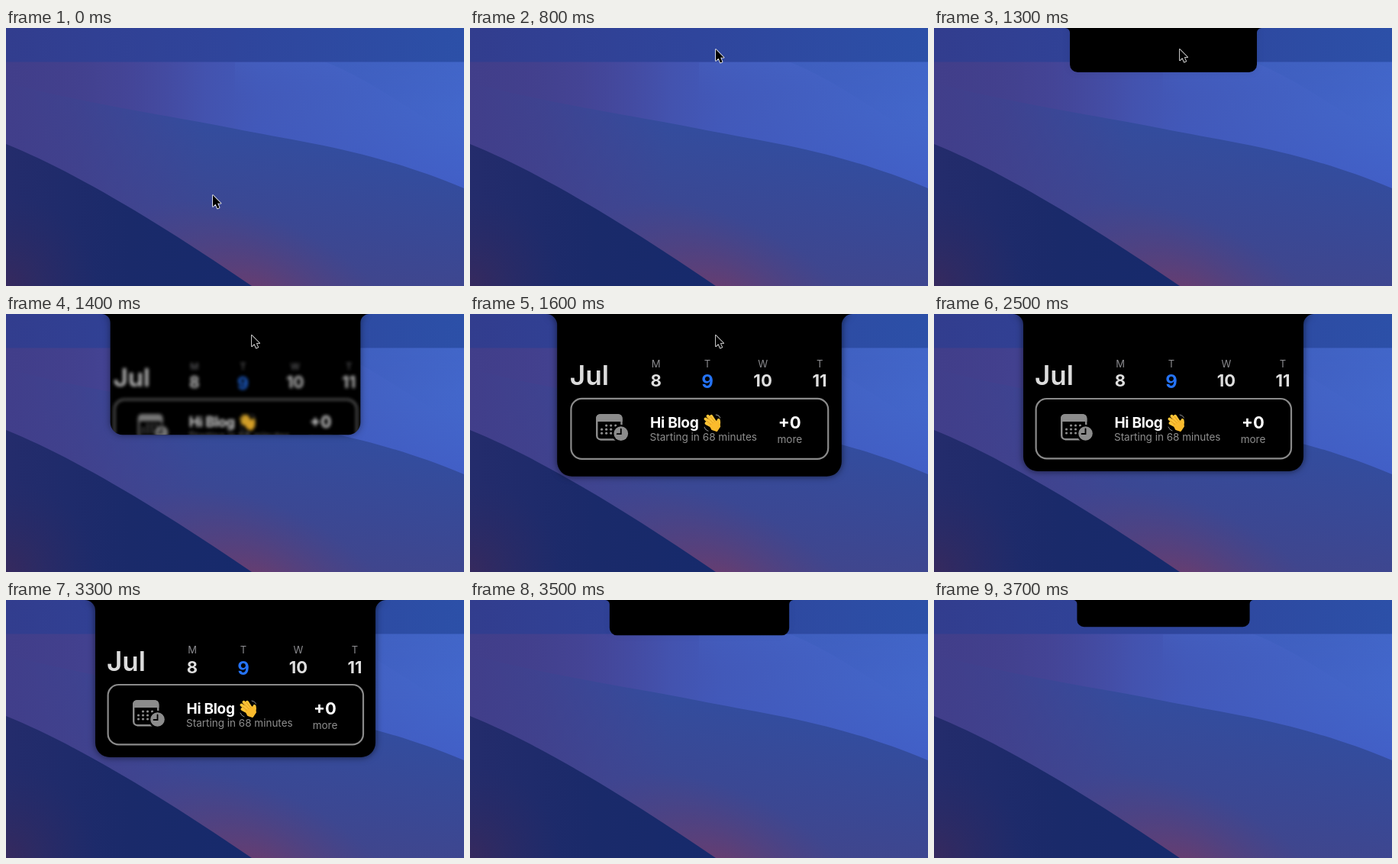
These frames come from a looping animation (600x338 px, 3800 ms). An HTML page:

```html
<!DOCTYPE html>
<html lang="en">
<head>
<meta charset="utf-8">
<title>Calendar panel</title>
<style>
  html, body { margin: 0; width: 100%; height: 100%; overflow: hidden; background: #3a4796; }
  svg { display: block; width: 100vw; height: 100vh; }
  text { font-family: Inter, "Liberation Sans", sans-serif; }
  .mid { text-anchor: middle; }
  .day { font-size: 13px; fill: #8b8b8f; }
  .date { font-size: 22px; font-weight: 700; fill: #dedede; }
  .note { font-size: 13.5px; fill: #8e8e8e; }
  .bold { font-weight: 700; fill: #fff; }
</style>
</head>
<body>
<svg viewBox="0 0 600 338">
  <defs>
    <linearGradient id="bar">
      <stop stop-color="#323d8e"/><stop offset=".5" stop-color="#2f459c"/><stop offset="1" stop-color="#2c50a8"/>
    </linearGradient>
    <linearGradient id="sky">
      <stop stop-color="#433f8e"/><stop offset=".25" stop-color="#45489d"/>
      <stop offset=".55" stop-color="#4259b9"/><stop offset="1" stop-color="#4368cc"/>
    </linearGradient>
    <linearGradient id="skyLow" x2="0" y2="1">
      <stop stop-color="#4c78d8" stop-opacity=".25"/><stop offset=".35" stop-color="#4058c0" stop-opacity="0"/>
      <stop offset="1" stop-color="#3f50be" stop-opacity=".8"/>
    </linearGradient>
    <linearGradient id="streak" x2=".6" y2="1">
      <stop stop-color="#3a5cba" stop-opacity=".55"/><stop offset="1" stop-color="#3f60c4" stop-opacity="0"/>
    </linearGradient>
    <linearGradient id="hill" gradientUnits="userSpaceOnUse" x1="340" y1="125" x2="290" y2="338">
      <stop stop-color="#324d9f"/><stop offset=".5" stop-color="#3a4894"/><stop offset="1" stop-color="#444488"/>
    </linearGradient>
    <linearGradient id="haze">
      <stop stop-color="#413e8a"/><stop offset=".35" stop-color="#423f8b" stop-opacity=".75"/>
      <stop offset="1" stop-color="#434292" stop-opacity="0"/>
    </linearGradient>
    <radialGradient id="glow" gradientUnits="userSpaceOnUse" cx="0" cy="0" r="1"
      gradientTransform="translate(335 350) rotate(25) scale(200 100)">
      <stop stop-color="#6c3c6c" stop-opacity=".95"/><stop offset="1" stop-color="#54407e" stop-opacity="0"/>
    </radialGradient>
    <linearGradient id="front">
      <stop stop-color="#242c6c"/><stop offset=".5" stop-color="#1a2a6a"/><stop offset="1" stop-color="#162a6c"/>
    </linearGradient>
    <radialGradient id="dusk" gradientUnits="userSpaceOnUse" cx="0" cy="338" r="120">
      <stop stop-color="#38295c" stop-opacity=".9"/><stop offset="1" stop-color="#2a2a64" stop-opacity="0"/>
    </radialGradient>
    <clipPath id="clip"><path class="shape"/></clipPath>
  </defs>

  <rect width="600" height="338" fill="url(#sky)"/>
  <rect x="300" y="45" width="300" height="165" fill="url(#skyLow)" opacity=".5"/>
  <path d="M420 45C470 65 520 100 600 152V45Z" fill="url(#streak)"/>
  <path d="M0 72C120 102 210 114 300 132S480 160 600 210V338H0Z" fill="url(#hill)"/>
  <rect width="260" height="338" fill="url(#haze)"/>
  <rect y="200" width="600" height="138" fill="url(#glow)"/>
  <path id="ridge" d="M0 152C82 185 190 248 322 338H0Z" fill="url(#front)"/>
  <path d="M0 152C82 185 190 248 322 338H0Z" fill="url(#dusk)"/>
  <rect width="600" height="44.5" fill="url(#bar)"/>

  <g id="panel">
    <path class="shape" id="body"/>
    <g clip-path="url(#clip)">
      <g id="content">
        <text x="132" y="93" font-size="35" font-weight="600" fill="#dcdcdc">Jul</text>
        <g id="week" class="mid"></g>
        <rect x="133.6" y="111" width="334.4" height="78.4" rx="14" fill="none" stroke="#8a8a8a" stroke-width="2.2"/>
        <g fill="#8c8c8c">
          <rect x="167.2" y="132.2" width="32" height="32" rx="5" fill="none" stroke="#8c8c8c" stroke-width="2.4"/>
          <path d="M166 141V137Q166 131 172 131H194Q200.400 131 200.400 137V141Z"/>
          <g id="dots"></g>
          <circle cx="198.500" cy="156.500" r="11.500" fill="#000"/>
          <circle cx="198.500" cy="156.500" r="9.300"/>
          <path d="M198.500 150.500V157H193.500" fill="none" stroke="#000" stroke-width="1.800" stroke-linecap="round"/>
        </g>
        <text class="bold" x="236.500" y="149" font-size="19" letter-spacing="-.3">Hi Blog</text>
        <g fill="none" stroke-linecap="round" stroke-linejoin="round">
          <path d="M319 148L309.500 143M319 146L308.500 137.500M320 144L311.500 133.800M322 143L316 133.800M323 149Q327 145 325.500 139"
            stroke="#fcc436" stroke-width="4"/>
          <path d="M314 145L324 140L327 147L323 153L317 151Z" fill="#fbbb2d" stroke="#fbbb2d" stroke-width="2"/>
          <path d="M315.500 144.500L310.500 140.500M318 142.500L311 135.500M320.500 141L315 134.500" stroke="#d88f1c" stroke-width=".8"/>
          <path d="M322 132Q326 132.500 327.500 136M307 148Q308.500 152 312 153" stroke="#8f8f8f" stroke-width="1"/>
        </g>
        <text class="note" x="236" y="166">Starting in 68 minutes</text>
        <text class="bold mid" x="418" y="150" font-size="22">+0</text>
        <text class="note mid" x="418" y="169">more</text>
      </g>
    </g>
  </g>

  <path id="cursor" d="M1 2V17L4.500 13.800L7 19.400L9.600 18.200L7.200 12.800H11.600Z"
    fill="#000" stroke="#fff" stroke-width="1.600" stroke-linejoin="round" paint-order="stroke"/>
</svg>
<script>
const LOOP = 3800, STEP = 100;
const OPEN = 1257, LEAVE = 1850, GONE = 2300, CLOSE = 3300;
const $ = id => document.getElementById(id);
const clamp = v => Math.max(0, Math.min(1, v));
const mix = (a, b, p) => a + (b - a) * p;
const inOut = p => p < .5 ? 4 * p ** 3 : 1 - 4 * (1 - p) ** 3;

$('week').innerHTML = [['M', 8, 244], ['T', 9, 311], ['W', 10, 383], ['T', 11, 457]].map(([day, date, x]) => {
  const today = date === 9 ? 'style="fill:#2573f6;font-size:24px" y="97.5"' : 'y="95.500"';
  return `<text class="day" x="${x}" y="70">${day}</text><text class="date" x="${x}" ${today}>${date}</text>`;
}).join('');

// Month grid: the first row lacks its first day, the last row its last one.
for (let i = 1; i < 11; i++) {
  const x = 173.5 + i % 4 * 6, y = 146 + Math.floor(i / 4) * 5;
  $('dots').innerHTML += `<circle cx="${x}" cy="${y}" r="1.600"/>`;
}

// Underdamped spring on opening, critically damped on closing.
function openness(t) {
  if (t < CLOSE) {
    const z = .71, wt = 14 * (t - OPEN) / 1000, d = Math.sqrt(1 - z * z);
    return 1 - Math.exp(-z * wt) * (Math.cos(d * wt) + z / d * Math.sin(d * wt));
  }
  const wt = 22 * (t - CLOSE) / 1000;
  return (1 + wt) * Math.exp(-wt);
}

function outline(p) {
  const half = mix(113, 183.5, p), h = mix(35, 206, p), ear = mix(5, 14, p), r = mix(9, 19, p);
  const l = 300.5 - half, R = 300.5 + half;
  return `M${l - ear} 0A${ear} ${ear} 0 0 1 ${l} ${ear}V${h - r}A${r} ${r} 0 0 0 ${l + r} ${h}` +
    `H${R - r}A${r} ${r} 0 0 0 ${R} ${h - r}V${ear}A${ear} ${ear} 0 0 1 ${R + ear} 0Z`;
}

function drawPanel(t) {
  const shown = t >= OPEN;
  $('panel').style.display = shown ? '' : 'none';
  if (!shown) return;
  const p = openness(t), d = outline(p), scale = mix(.82, 1, p), blur = clamp(1 - p) * 9;
  document.querySelectorAll('.shape').forEach(s => s.setAttribute('d', d));
  $('body').style.filter = `drop-shadow(0 0 5px rgba(0,0,0,${.6 * clamp(p)}))`;
  const c = $('content');
  c.setAttribute('transform', `translate(301 130) scale(${scale}) translate(-301 -130)`);
  c.style.filter = blur > .1 ? `blur(${blur}px)` : 'none';
  c.style.opacity = clamp(p * 1.2 - .02);
}

function drawCursor(t) {
  const up = inOut(clamp((t - 40) / 720)), out = clamp((t - LEAVE) / 350) ** 2;
  const x = mix(270, 321, Math.min(1, up * 1.05)) + 214 * out;
  const y = mix(217, 26, up) + 276 * out;
  const size = t < 1000 ? 1 : .96;
  $('cursor').style.display = t < GONE ? '' : 'none';
  $('cursor').setAttribute('transform', `translate(${x} ${y}) scale(${size})`);
}

function frame(now) {
  const t = Math.floor(now % LOOP / STEP) * STEP;
  drawPanel(t);
  drawCursor(t);
  requestAnimationFrame(frame);
}
frame(performance.now());
</script>
</body>
</html>
```
